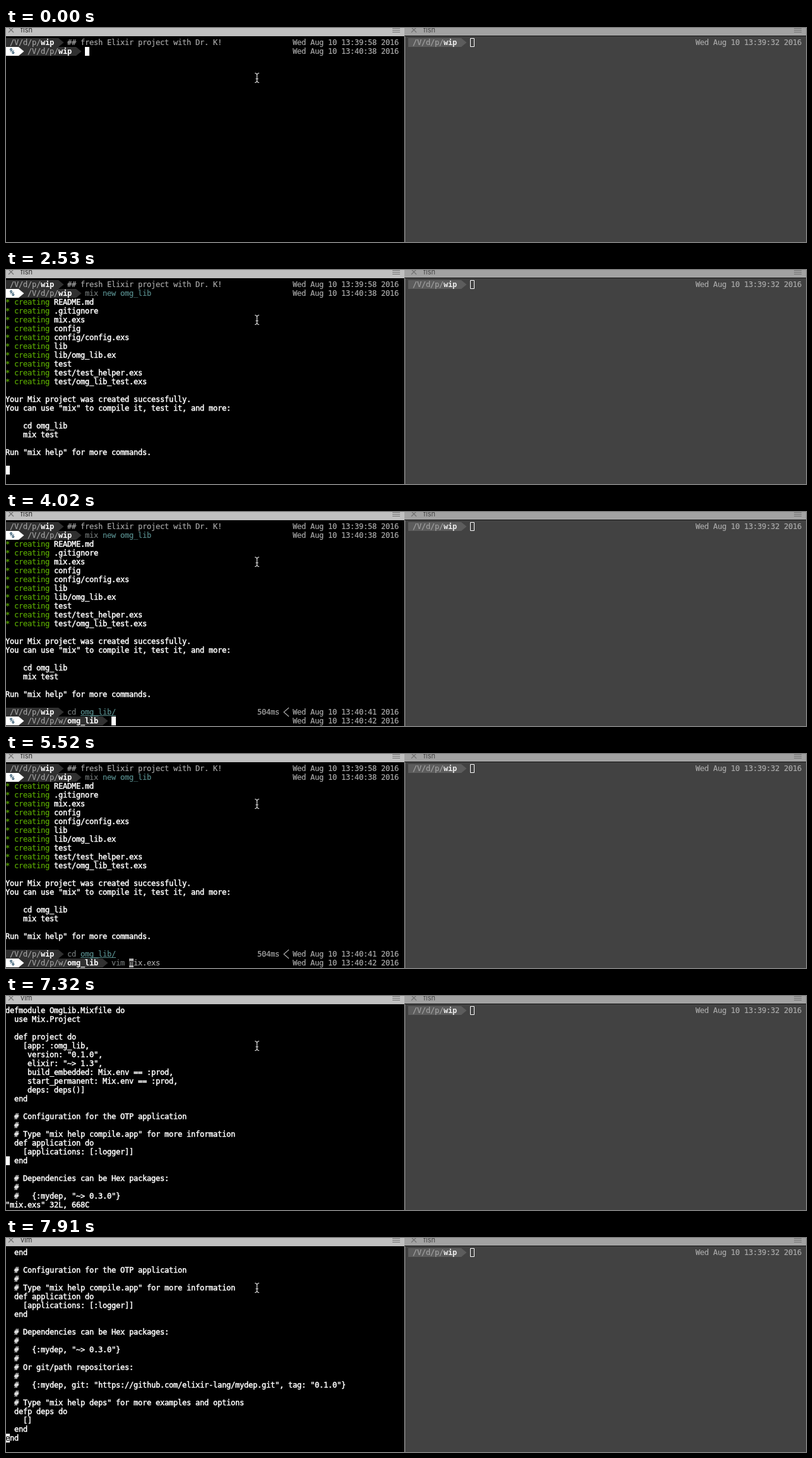
Write an HTML page with a canvas that moves like this. It is 1267 px wide and 339 px high and loops after 8000 ms.

```html
<!DOCTYPE html>
<html lang="en">
<head>
<meta charset="utf-8">
<title>Terminal session</title>
<style>
html, body { margin: 0; width: 100%; height: 100%; overflow: hidden; background: #000; }
canvas { display: block; }
</style>
</head>
<body>
<canvas id="stage" width="1267" height="339"></canvas>
<script>
const ctx = document.getElementById('stage').getContext('2d');
const LOOP = 8000, CELL = 7, LINE = 14, TOP = 16, LEFT = -1, RIGHT = 637;
const GRAY = '#a8a8a8', TEAL = '#568a8a', DIM = '#727878';

const CREATED = ['README.md', '.gitignore', 'mix.exs', 'config', 'config/config.exs',
  'lib', 'lib/omg_lib.ex', 'test', 'test/test_helper.exs', 'test/omg_lib_test.exs'];

const SUMMARY = `Your Mix project was created successfully.
You can use "mix" to compile it, test it, and more:

    cd omg_lib
    mix test

Run "mix help" for more commands.`.split('\n');

const MIXFILE = `defmodule OmgLib.Mixfile do
  use Mix.Project

  def project do
    [app: :omg_lib,
     version: "0.1.0",
     elixir: "~> 1.3",
     build_embedded: Mix.env == :prod,
     start_permanent: Mix.env == :prod,
     deps: deps()]
  end

  # Configuration for the OTP application
  #
  # Type "mix help compile.app" for more information
  def application do
    [applications: [:logger]]
  end

  # Dependencies can be Hex packages:
  #
  #   {:mydep, "~> 0.3.0"}
  #
  # Or git/path repositories:
  #
  #   {:mydep, git: "https://github.com/elixir-lang/mydep.git", tag: "0.1.0"}
  #
  # Type "mix help deps" for more examples and options
  defp deps do
    []
  end
end`.split('\n');

// Keystrokes: [time, command line, characters typed so far]
const NEW_KEYS = [[0, '', 0], [150, 'mix deps.get', 2], [300, 'mix deps.get', 4],
  [1200, 'mix new omg_lib', 6], [1340, 'mix new omg_lib', 8], [1790, 'mix new omg_lib ', 16]];
const CD_KEYS = [[2680, '', 0], [2830, 'cd omg_lib/', 1], [2980, 'cd omg_lib/', 2],
  [3130, 'cd omg_lib/', 3], [3270, 'cd omg_lib/', 4], [3420, 'cd omg_lib/', 11]];
const VIM_KEYS = [[4020, '', 0], [5370, 'vim mix.exs', 2], [5520, 'vim mix.exs', 4],
  [5820, 'vim mix.exs', 6], [5970, 'vim mix.exs ', 12]];

function rect(x, y, w, h, color) {
  ctx.fillStyle = color;
  ctx.fillRect(x, y, w, h);
}

function stroke(color, width, path) {
  ctx.strokeStyle = color;
  ctx.lineWidth = width;
  ctx.stroke(new Path2D(path));
}

const rowY = row => TOP + row * LINE;

function put(text, col, row, color, bold = false, left = LEFT) {
  ctx.font = `${bold ? 'bold ' : ''}12px "DejaVu Sans Mono", monospace`;
  ctx.fillStyle = ctx.strokeStyle = color;
  ctx.lineWidth = color === '#fff' ? 0.45 : 0.2;
  [...text].forEach((char, i) => {
    if (char === ' ') return;
    const x = left + (col + i) * CELL, y = rowY(row) + 11;
    ctx.fillText(char, x, y);
    if (!bold) ctx.strokeText(char, x, y);
  });
}

function cursor(col, row, char = ' ', color = '#fff') {
  rect(LEFT + col * CELL, rowY(row), CELL, LINE, color);
  put(char, col, row, '#000');
}

function segment(from, to, row, color, left = LEFT) {
  const x = left + to * CELL, y = rowY(row);
  rect(left + from * CELL, y, x - left - from * CELL, LINE, color);
  ctx.beginPath();
  ctx.moveTo(x, y);
  ctx.lineTo(x + 8.5, y + LINE / 2);
  ctx.lineTo(x, y + LINE);
  ctx.fill();
}

// Draws a prompt and returns the column where its command starts.
function prompt(row, time, { path = '/V/d/p/', dir = 'wip', flag = false, left = LEFT, back = '#303030' } = {}) {
  const start = flag ? 5 : 1, nameCol = start + path.length, end = nameCol + dir.length + 1;
  segment(0, end, row, back, left);
  if (flag) {
    segment(0, 3, row, '#fff', left);
    put('%', 1, row, '#103c58', true, left);
  }
  put(path, start, row, '#a0a0a0', false, left);
  put(dir, nameCol, row, left === LEFT ? '#fff' : '#ececec', true, left);
  put(`Wed Aug 10 ${time} 2016`, 65, row, GRAY, false, left);
  return end + 2;
}

function command(keys, t, col, row, active) {
  const [, text, typed] = keys.filter(key => key[0] <= t).pop();
  const wordEnd = text.indexOf(' ');
  put(text.slice(0, Math.min(typed, wordEnd)), col, row, DIM);
  if (typed > wordEnd) put(text.slice(wordEnd, typed), col + wordEnd, row, TEAL);
  put(text.slice(typed), col + typed, row, GRAY);
  if (active) cursor(col + typed, row, text[typed], typed < text.length ? '#b0b0b0' : '#fff');
}

function shell(t) {
  put('## fresh Elixir project with Dr. K!', prompt(0, '13:39:58'), 0, GRAY);
  command(NEW_KEYS, t, prompt(1, '13:40:38', { flag: true }), 1, t < 2080);
  if (t < 2080) return;
  if (t < 2530) return cursor(0, 2);

  CREATED.forEach((file, i) => {
    put('* creating', 0, i + 2, '#5aa800');
    put(file, 11, i + 2, '#fff');
  });
  SUMMARY.forEach((line, i) => put(line, 0, i + 13, '#fff'));
  if (t < 2680) return cursor(0, 21);

  const col = prompt(21, '13:40:41');
  put('504ms', 57, 21, GRAY);
  stroke(GRAY, 1.2, 'M448 310 L440 317 L448 324');
  command(CD_KEYS, t, col, 21, t < 3870);
  if (t >= 3420) rect(118, 322, 56, 1, TEAL);
  if (t < 3870) return;
  if (t < 4020) return cursor(0, 22);
  command(VIM_KEYS, t, prompt(22, '13:40:42', { path: '/V/d/p/w/', dir: 'omg_lib', flag: true }), 22, true);
}

function vim(t) {
  const step = Math.floor((t - 6870 + 10) / 148.6);
  const line = t < 6570 ? 0 : t < 6870 ? 1 : Math.min(31, 5 + 4 * step);
  const scroll = Math.max(0, line - 21);
  MIXFILE.slice(scroll, scroll + 22).forEach((text, row) => put(text, 0, row, '#fff'));
  if (!scroll) put('"mix.exs" 32L, 668C', 0, 22, '#fff');
  cursor(0, line - scroll, MIXFILE[line][0]);
}

function tab(x, width, title, back, ink, mark) {
  rect(x, 0, width, 13, back);
  ctx.font = '11px Inter, sans-serif';
  ctx.fillStyle = ink;
  ctx.fillText(title, x + 23, 7);
  stroke(mark, 1.2, `M${x + 4} -1 l8 8 m0 -8 l-8 8`);
  for (const y of [0, 3, 6]) rect(x + width - 19, y, 12, 1, mark);
}

function draw(now) {
  const t = now % LOOP;
  rect(0, 0, 1267, 339, '#000');
  if (t < 6270) shell(t); else vim(t);

  rect(631, 13, 1, 326, '#bcbcbc');
  rect(632, 13, 635, 326, '#424242');
  prompt(0, '13:39:32', { left: RIGHT, back: '#5c5c5c' });
  stroke('#fff', 1, 'M735.5 16.5 h6 v13 h-6 z');

  tab(0, 631, t < 6870 ? 'fish' : 'vim', '#c0c0c0', '#303030', '#707070');
  tab(638, 629, 'fish', '#a2a2a2', '#484848', '#707070');
  rect(631, 0, 7, 13, '#a2a2a2');
  rect(631, 12, 636, 1, '#181818');

  stroke('#e0e0e0', 1.2, 'M394 71.5 Q397.5 71.5 397.5 75 V83 Q397.5 86.5 394 86.5 M401 71.5 Q397.5 71.5 397.5 75 M397.5 83 Q397.5 86.5 401 86.5 M395.5 80.5 h4');
  requestAnimationFrame(() => draw(performance.now() - start));
}

const start = performance.now();
draw(0);
</script>
</body>
</html>
```
